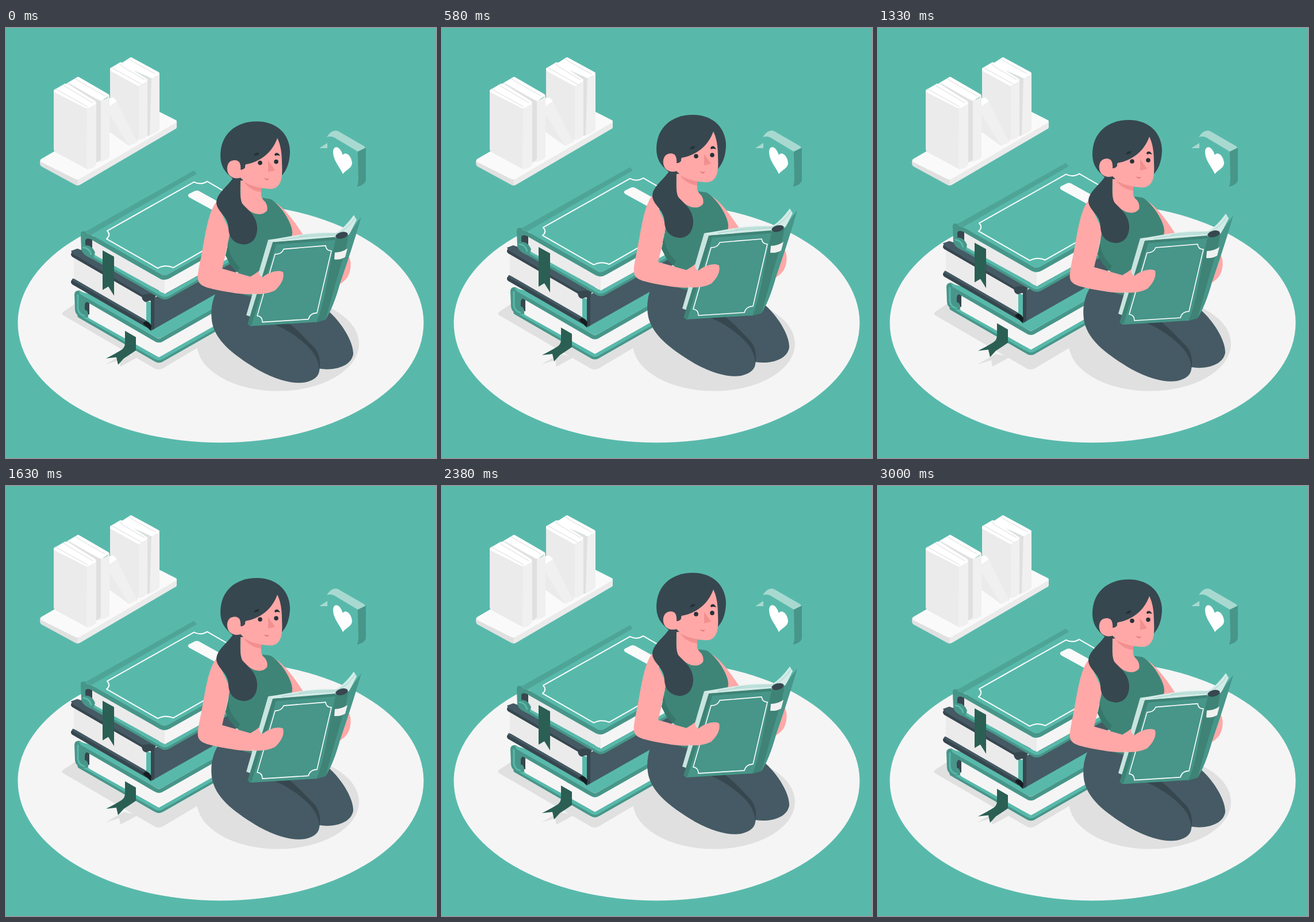
Write an HTML page that moves like this. It is 748 px wide and 748 px high and loops after 3040 ms.

```html
<!DOCTYPE html>
<html lang="en">
<head>
<meta charset="utf-8">
<title>Reading</title>
<style>
  html, body { margin: 0; width: 100%; height: 100%; overflow: hidden; background: #58b9ab; }
  svg { display: block; width: 100vw; height: 100vh; }
  .teal { fill: #58b9ab; } .mid { fill: #479689; } .deep { fill: #3e8376; } .forest { fill: #2b5f54; }
  .slate { fill: #455a64; } .ink { fill: #37474f; } .eye { fill: #263238; }
  .skin { fill: #ffa8a7; } .blush { fill: #f28f8f; }
  .white { fill: #fff; } .g1 { fill: #fafafa; } .g2 { fill: #f0f0f0; } .g3 { fill: #ebebeb; } .g4 { fill: #e0e0e0; }
  .page { fill: #f5f5f5; }
  .line { fill: none; stroke-linejoin: round; stroke-linecap: round; }
  .s-teal { stroke: #58b9ab; } .s-mid { stroke: #479689; } .s-ink { stroke: #37474f; } .s-slate { stroke: #455a64; }
  .s-white { stroke: #fff; } .s-grey { stroke: #e3e3e3; stroke-width: 1.2; }
</style>
</head>
<body>
<svg viewBox="0 0 748 748">
  <rect class="teal" width="748" height="748"/>
  <ellipse class="page" cx="373.5" cy="513" rx="353" ry="208.3"/>

  <!-- ground shadows -->
  <g class="g4">
    <path d="M99 494Q96 498 100 500L258 592Q265 596 273 592L332 557L400 520L180 440Z"/>
    <path d="M173 585L205 567L230 572Q220 578 199 589L197 578Z"/>
    <ellipse cx="473" cy="549.5" rx="141" ry="82"/>
  </g>

  <!-- shelf -->
  <path class="g4" d="M59 231L125 264V274Q122 274 119 272L62 241Q59 239 59 236Z"/>
  <path class="g3" d="M125 263L297 162V172Q297 175 294 176L130 272Q127 274 124 274Z"/>
  <path class="g1" d="M61 228L229 130Q232 128 236 130L295 160Q299 162 295 165L129 262Q125 265 121 263L61 233Q58 231 61 228Z"/>

  <!-- shelved books, back to front -->
  <path class="g4" d="M198 63L253 88V185L246 188L230 180Z"/>
  <path class="g2" d="M253 87Q260 86 267 78V176Q266 180 250 187Z"/>
  <path class="white" d="M198 63L215 52Q217 50 220 52L266 77Q268 79 264 82L257 86Q253 89 249 86Z"/>
  <path class="line s-grey" d="M200 65L246 91M215 54L222 59L260 80"/>
  <path class="g3" d="M181 72L232 101V195L181 166Z"/>
  <path class="g2" d="M231 101Q240 100 246 91V186Q242 193 231 195Z"/>
  <path class="white" d="M181 70L198 60Q200 59 202 60L245 89Q247 91 244 94L236 99Q232 102 228 100L181 74Z"/>
  <path class="line s-grey" d="M184 69L236 98M198 63L204 68L241 90"/>
  <path class="g3" d="M179 128L190 126L229 193V198L214 205L179 180Z"/>
  <path class="g2" d="M180 135L192 126L228 198L214 205L180 150Z"/>
  <path class="white" d="M179 122L187 121L193 127L180 136Z"/>
  <path class="g4" d="M106 96L166 127V230L157 234Z"/>
  <path class="g2" d="M165 126Q174 125 180 117V224Q178 230 159 234L165 228Z"/>
  <path class="white" d="M106 96L123 86Q125 84 128 86L178 115Q181 117 178 119L169 125Q165 128 161 125Z"/>
  <path class="line s-grey" d="M109 96L160 126M121 88L128 93L172 118"/>
  <path class="g3" d="M83 109L142 140V246L86 216Q83 214 83 211Z"/>
  <path class="g2" d="M141 139Q150 138 157 130V236Q155 244 140 246Z"/>
  <path class="white" d="M83 108L102 97Q104 96 107 97L155 127Q158 130 155 133L146 138Q141 141 136 138L83 111Z"/>
  <path class="line s-grey" d="M86 106L142 137M100 99L107 104L151 130"/>

  <!-- speech bubble -->
  <path fill="#a8d9d0" d="M558 190Q566 176 577 179L622 205Q626 208 626 211L612 215L572 191Q565 187 558 190ZM545 209L559 200V209Z"/>
  <path class="mid" d="M612 215L626 208V264Q625 273 610 276Q613 273 613 262Z"/>
  <path class="white" d="M586 254C580 241 569 230 569 216C569 204 580 203 586 221C590 214 601 221 602 235C602 244 591 247 586 254Z"/>

  <g id="pile">
    <!-- lower book -->
    <path class="line s-mid" stroke-width="7" d="M128 501L260 577Q266 581 272 577L400 504"/>
    <path class="line s-teal" stroke-width="6" d="M128 497L260 573Q266 577 272 573L400 500"/>
    <path class="page" d="M138 476L266 546V573L146 506Q138 500 138 494Z"/>
    <path class="page" d="M266 546L400 470V497L266 573Z"/>
    <path class="ink" d="M128 468L145 478V499L128 492Z"/>
    <path class="mid" d="M119 463Q120 456 128 457L147 468L148 477Q138 474 137 482V490Q144 492 143 503L132 504Q121 500 120 491Z"/>
    <path class="line s-teal" stroke-width="3" d="M125 465V489Q127 499 136 501"/>
    <path class="line s-mid" stroke-width="7" d="M143 474L260 542Q266 546 272 542L400 469"/>
    <path class="teal" d="M126 458L250 490L400 430V466L270 539Q266 541 262 539L130 464Z"/>

    <!-- middle book -->
    <path class="slate" d="M256 471L400 389V443L252 527Z"/>
    <path class="g3" d="M118 400L244 470V510L118 438Z"/>
    <path class="line s-ink" stroke-width="10" d="M118 442L246 516"/>
    <path class="line s-slate" stroke-width="4" d="M117 438L240 509"/>
    <path class="teal" d="M244 474L253 478V516L244 509Z"/>
    <path class="line s-ink" stroke-width="6" d="M255 474V522"/>
    <path d="M238 514Q245 506 253 518L252 527Z" fill="#151d21"/>
    <path class="line s-ink" stroke-width="10" d="M118 394L246 468"/>
    <path class="slate" d="M113 388L124 384L200 410L270 450L258 471Q252 468 248 472L240 466L116 393Z"/>
    <path class="ink" d="M236 465Q250 460 260 466L257 477Q250 472 244 477Q236 476 236 465Z"/>

    <!-- upper book -->
    <path class="line s-mid" stroke-width="7" d="M138 391L270 467Q276 471 283 467L400 401"/>
    <path class="line s-teal" stroke-width="6" d="M138 387L270 463Q276 467 283 463L400 397"/>
    <path class="g3" d="M148 362L277 434V463L156 396L148 388Z"/>
    <path class="page" d="M276 434L400 365V394L276 463Z"/>
    <path class="ink" d="M134 358L150 367V389L134 382Z"/>
    <path class="mid" d="M130 360Q129 352 138 354L158 366L157 372Q139 362 138 370V378Q150 378 155 391L151 402Q134 396 131 386Z"/>
    <path class="line s-teal" stroke-width="3" d="M135 382Q145 383 148 394"/>
    <path class="line s-mid" stroke-width="8" d="M154 367L270 433Q276 436 283 432L400 366"/>
    <path class="teal" d="M139 357L330 250L400 289V363L282 429Q276 432 270 429L150 361Z"/>
    <path fill="#4ea597" d="M137 355L327 248L332 254L148 360Z"/>
    <path class="line s-white" stroke-width="2" d="M176 353L327 268Q339 274 350 267L400 296M176 353Q183 360 175 367L264 418Q277 411 291 417L400 355"/>
    <path class="g1" d="M318 289L328 284Q332 282 336 284L390 314L372 324L319 295Q315 292 318 289Z"/>

    <!-- ribbons -->
    <path class="forest" d="M168 387L188 398V466L178 450L168 456ZM207 527L226 538V561Q216 568 205 575L195 586L192 573L174 575Q190 567 201 560Q207 556 207 548Z"/>
  </g>

  <g id="reader">
    <!-- legs -->
    <path class="slate" d="M372 450C357 470 355 496 359 515C367 549 402 573 440 596C473 614 500 620 520 617C538 613 546 604 545 593C570 597 600 590 604 568C605 545 580 507 556 489L440 450Z"/>
    <path class="ink" d="M467 516C500 530 527 553 537 569C543 580 545 588 545 597C548 580 545 565 535 555C520 540 508 526 492 514Z"/>

    <!-- torso -->
    <path class="skin" d="M452 297C480 303 502 338 521 366L496 372C500 345 480 315 452 300Z"/>
    <path fill="#3e8578" d="M390 300L409 296L446 296L460 298C478 308 498 340 498 356C498 368 490 376 488 384L440 470Q420 468 402 460L404 426L390 412L382 396Q386 380 388 365Z"/>
    <path fill="#37776a" d="M386 378Q390 402 407 417L402 426L390 412L382 396Z"/>
    <path class="skin" d="M408 250L444 272V293Q446 299 451 303Q456 311 454 318C446 329 425 327 408 303Z"/>
    <path class="blush" d="M414 268Q428 277 444 277V286Q424 283 414 268Z"/>
    <path class="skin" d="M366 303C352 320 347 358 340 396C335 420 333 430 334 438C336 451 352 454 400 462C432 466 456 463 470 456L480 440L440 424L425 433L376 419Q378 410 381 398L390 355Z"/>

    <!-- head -->
    <path class="ink" d="M397 258C387 276 366 287 366 305C367 320 387 328 387 350C388 368 400 377 415 377C430 376 437 364 437 348C436 326 420 317 411 306C406 296 408 277 408 258Z"/>
    <path class="ink" d="M373 222C373 186 399 163 436 163C473 163 494 187 494 217C493 238 487 250 478 259L408 266L394 262C379 250 373 239 373 222Z"/>
    <path class="skin" d="M472 192C478 204 480 219 480 236C481 256 480 268 473 275C466 283 455 280 445 279C430 276 417 271 407 260L408 247C414 247 416 243 416 238C441 234 463 218 472 192Z"/>
    <path class="skin" d="M410 240C406 229 397 229 391 232C383 237 383 250 389 257C395 263 404 263 410 260Z"/>
    <path class="ink" d="M405 232L420 234Q415 238 416 243Q413 247 408 247Q409 239 405 232Z"/>
    <path class="eye" d="M431 223Q432 217 440 217Q441 219 438 222ZM467 220Q472 214 477 223Q472 221 468 223Z"/>
    <circle class="eye" cx="442" cy="235" r="3.8"/>
    <circle class="eye" cx="470" cy="233" r="3.8"/>
    <path class="blush" d="M456 231L468 248L456 251Z"/>
    <path d="M448 261Q453 263 458 262Q455 269 448 261Z" fill="#e88080"/>

    <!-- open book -->
    <path class="skin" d="M590 392C602 398 602 420 594 434Q588 442 579 447Z"/>
    <path fill="#d3ebe7" d="M456 369C490 365 530 353 574 357Q590 347 605 326L610 334L598 358L573 367L466 376Z"/>
    <path class="line" stroke="#9fcfc7" d="M480 369C515 362 550 362 577 360M510 363C535 358 560 360 580 357M577 358Q595 350 607 331"/>
    <path fill="#c9e4df" d="M456 369L466 374L426 503L418 500Z"/>
    <path class="deep" d="M572 366L597 360Q592 400 582 430Q570 480 556 508L538 513Z"/>
    <path class="mid" d="M595 362Q606 344 618 329Q605 375 581 445Q570 485 556 508Q574 440 588 395Q593 380 595 362Z"/>
    <path class="mid" d="M465 373L574 365Q566 400 558 445Q550 490 540 512L425 519L421 515Z"/>
    <path class="deep" d="M464 373L573 364V369L470 377L427 518L420 516Z"/>
    <path class="g2" d="M572 391Q584 391 594 384L590 399Q582 404 571 403Z"/>
    <ellipse class="ink" cx="584" cy="361" rx="11" ry="5.5" transform="rotate(-14 584 361)"/>
    <path class="line s-white" stroke-width="1.6" d="M483 385L556 379Q557 388 566 388L541 496Q529 496 526 507L446 512Q446 502 437 501L468 394Q480 394 483 385Z"/>
    <path class="skin" d="M426 434L440 423Q440 432 446 434C456 426 473 420 482 425C485 436 478 448 468 457Q452 465 430 463Z"/>
  </g>
</svg>
<script>
  const LOOP = 3040, STEP = 1000 / 24, LIFT = 15, LEAD = 20;
  const parts = [["pile", 3000], ["reader", 1500]]
    .map(([id, period]) => ({ el: document.getElementById(id), period }));

  // Linear rise and fall, 0 at both ends of the period
  const rise = (t, period) => {
    const p = (t % period) / period;
    return LIFT * (1 - Math.abs(2 * p - 1));
  };

  const start = performance.now();
  function draw() {
    const t = (performance.now() - start) % LOOP;
    const held = Math.floor((t + 5) / STEP) % 73 * STEP + LEAD;
    for (const { el, period } of parts)
      el.setAttribute("transform", `translate(0 ${-rise(held, period).toFixed(2)})`);
    requestAnimationFrame(draw);
  }
  draw();
</script>
</body>
</html>
```
